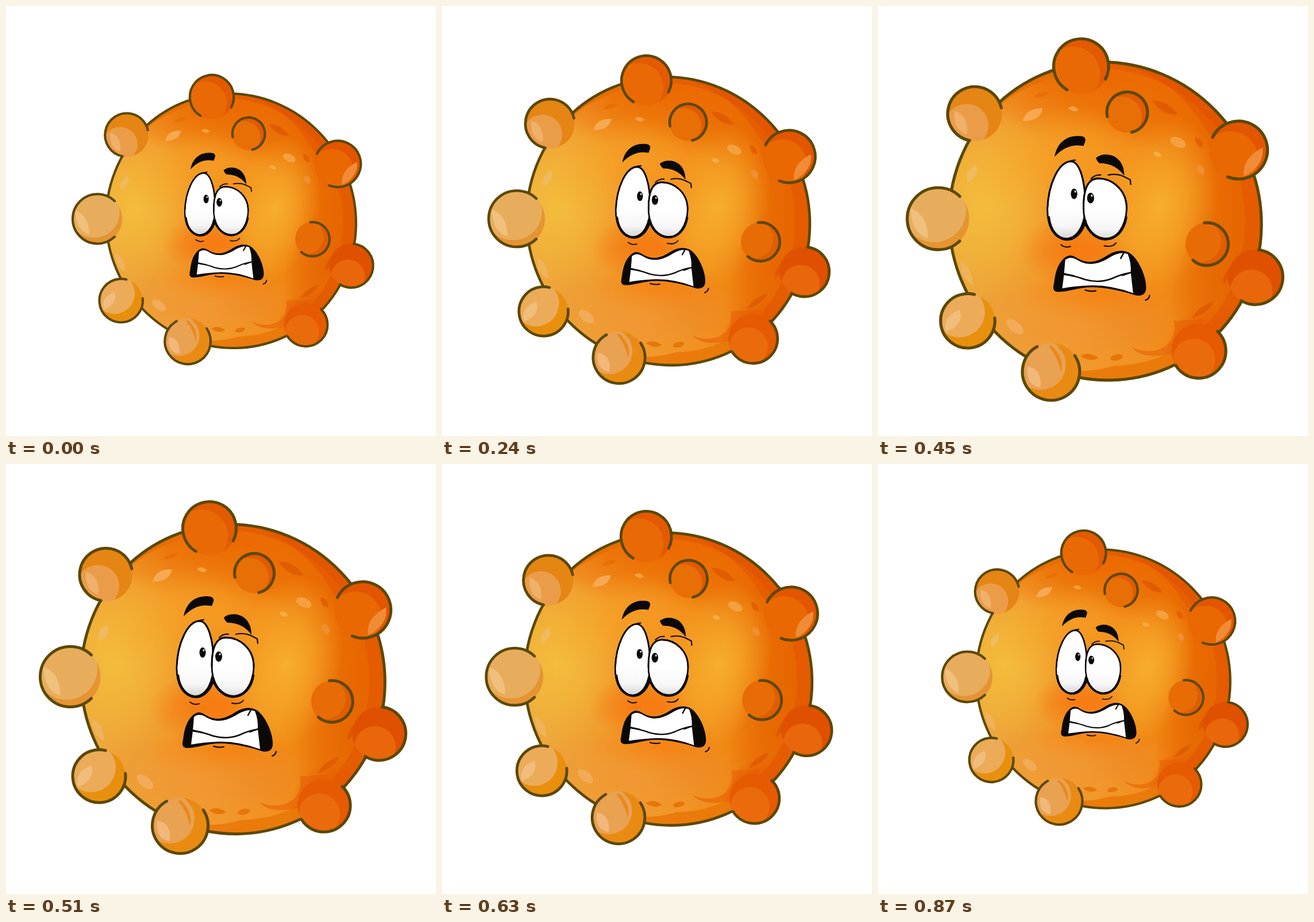
An HTML page with a canvas that plays this animation: 748x748 px, repeating every 0.9 s.

```html
<!DOCTYPE html>
<html lang="en">
<head>
<meta charset="utf-8">
<title>Pulsing germ</title>
<style>
html, body { margin: 0; width: 100%; height: 100%; overflow: hidden; background: #fff; }
canvas { display: block; width: 748px; height: 748px; }
</style>
</head>
<body>
<canvas id="stage" width="748" height="748"></canvas>
<script>
const ctx = document.getElementById('stage').getContext('2d');
const LOOP = 900, STEP = 30, GROWTH = 0.25;
const DRAWN_SCALE = 1 + GROWTH * 390 / 450; // size at which the shapes below are measured
const CENTER = { x: 376.4, y: 371.6 };
const OUTLINE = '#5b4806';
const rad = deg => deg * Math.PI / 180;

function ellipse(x, y, rx, ry, fill, deg = 0) {
  ctx.beginPath();
  ctx.ellipse(x, y, rx, ry, rad(deg), 0, 7);
  ctx.fillStyle = fill;
  ctx.fill();
}

function glow(x, y, rx, ry, rgb, alpha, deg = 0) {
  ctx.save();
  ctx.translate(x, y);
  ctx.rotate(rad(deg));
  ctx.scale(rx, ry);
  const g = ctx.createRadialGradient(0, 0, 0, 0, 0, 1);
  g.addColorStop(0, `rgba(${rgb},${alpha})`);
  g.addColorStop(0.45, `rgba(${rgb},${alpha * 0.65})`);
  g.addColorStop(1, `rgba(${rgb},0)`);
  ellipse(0, 0, 1, 1, g);
  ctx.restore();
}

function shape(d, fill, stroke, width) {
  const path = new Path2D(d);
  if (fill) { ctx.fillStyle = fill; ctx.fill(path); }
  if (stroke) { ctx.strokeStyle = stroke; ctx.lineWidth = width; ctx.stroke(path); }
}

// Pointed almond-shaped freckle
function leaf(x, y, length, width, deg, fill) {
  ctx.save();
  ctx.translate(x, y);
  ctx.rotate(rad(deg));
  shape(`M${-length} 0Q${-length * 0.2} ${-width * 2} ${length} 0Q${length * 0.2} ${width * 2} ${-length} 0Z`, fill);
  ctx.restore();
}

function bodyPath() {
  ctx.beginPath();
  ctx.ellipse(394.8, 374.2, 270.3, 263.4, rad(67), 0, 7);
}

function drawBody() {
  ctx.save();
  bodyPath();
  ctx.clip();
  const base = ctx.createLinearGradient(135, 430, 660, 290);
  base.addColorStop(0, '#eca43c');
  base.addColorStop(0.3, '#f19a2a');
  base.addColorStop(0.6, '#f08a16');
  base.addColorStop(0.85, '#e96b02');
  base.addColorStop(1, '#e66000');
  ctx.fillStyle = base;
  ctx.fillRect(120, 90, 560, 570);

  glow(390, 125, 290, 125, '235,104,0', 1, 5);
  glow(190, 345, 125, 165, '244,190,60', 0.95, 10);
  glow(290, 265, 130, 75, '246,165,40', 0.55, -25);
  glow(375, 270, 120, 70, '247,155,35', 0.7);
  glow(487, 350, 95, 155, '247,176,48', 0.95, 14);
  glow(335, 425, 85, 60, '246,116,12', 0.75);
  glow(375, 424, 60, 35, '250,118,16', 0.6);
  glow(375, 500, 130, 50, '246,124,12', 0.7);
  glow(330, 560, 170, 75, '240,150,55', 0.7, 10);
  glow(450, 545, 90, 60, '238,136,40', 0.6);
  glow(600, 470, 85, 160, '230,100,0', 0.8, 20);
  glow(572, 582, 80, 65, '231,86,0', 1, -25);

  // Rim shadow on the top, the right and the bottom
  shape('M310 122C470 88 590 180 622 300C657 440 590 545 520 590L555 660L700 590V90H310Z', 'rgba(227,88,0,.68)');
  shape('M395 100C485 120 530 160 570 226L690 300V90Z', 'rgba(224,76,0,.42)');
  shape('M193 555C260 620 335 642 410 619C455 618 492 607 525 582L530 650H180Z', 'rgba(233,119,8,.85)');
  shape('M511 543C520 586 478 605 440 588C456 607 495 606 526 590L565 540Z', 'rgba(229,94,4,.55)');
  shape('M219 176Q255 146 314 129L306 116Q255 134 215 166Z', 'rgba(229,107,0,.75)');

  leaf(272, 194, 20, 8, -32, '#f6a952');
  leaf(341, 184, 9, 4, 8, '#f5a13d');
  ellipse(518, 241, 14, 8, '#f4a03e', 25);
  ellipse(483, 261, 7, 4, '#f6ab45', 20);
  ellipse(556, 287, 6, 9, '#f08e32', -30);
  ellipse(242, 553, 17, 9, '#f1ab59', 40);
  leaf(169, 294, 16, 7, -65, '#f0ba60');
  leaf(160, 462, 22, 7, 62, '#f0b35c');
  leaf(287, 160, 14, 4, -20, '#e76f04');
  leaf(496, 182, 25, 7, 28, '#e15c00');
  leaf(554, 241, 11, 5, 52, '#e35f00');
  leaf(603, 464, 19, 5, -63, '#dd5900');
  leaf(561, 524, 24, 5, -38, '#df5c00');
  leaf(368, 604, 15, 5, 5, '#e67608');
  ellipse(414, 605, 11, 5, '#e67608', -12);
  ctx.restore();

  bodyPath();
  ctx.strokeStyle = OUTLINE;
  ctx.lineWidth = 5;
  ctx.stroke();
}

function knob({ at: [x, y, r], line: [from, to], dark, light, spot: [sx, sy, sr], shine }) {
  ctx.save();
  ctx.beginPath();
  ctx.arc(x, y, r, 0, 7);
  ctx.clip();
  ctx.fillStyle = dark;
  ctx.fillRect(x - r, y - r, r * 2, r * 2);
  ellipse(x + sx, y + sy, sr, sr, light);
  if (shine) {
    const [dx, dy, rx, ry, deg, color] = shine;
    leaf(x + dx, y + dy, rx, ry, deg, color);
  }
  ctx.restore();
  ctx.beginPath();
  ctx.arc(x, y, r, rad(from), rad(to));
  ctx.strokeStyle = OUTLINE;
  ctx.lineWidth = 5;
  ctx.stroke();
}

const knobs = [
  { at: [354, 112, 46.5], line: [121, 388], dark: '#e35a03', light: '#e96a05', spot: [-14, 13, 46] },
  { at: [174, 192.5, 46], line: [101, 347], dark: '#e58513', light: '#eb9c48', spot: [-14, 20, 37], shine: [-24, 15, 23, 9, 62, '#efb06a'] },
  { at: [112, 370, 52.5], line: [46, 314], dark: '#e59432', light: '#e8ad5c', spot: [-7, -14, 54], shine: [-32, 8, 29, 10, 60, '#f0c07d'] },
  { at: [162, 543, 46], line: [-6, 284], dark: '#e98f0e', light: '#ebab59', spot: [-14, -15, 43], shine: [-25, 0, 22, 10, -58, '#f1bd7c'] },
  { at: [303, 629, 48.5], line: [-34, 241], dark: '#e98b12', light: '#e9a152', spot: [-18, -12, 43], shine: [-29, 9, 21, 10, 58, '#f1b87a'] },
  { at: [553, 594, 46], line: [-46, 148], dark: '#e65a02', light: '#ea6b0c', spot: [-8, 15, 36] },
  { at: [649, 469, 46.5], line: [-83, 121], dark: '#df5000', light: '#e9660a', spot: [-7, 23, 36] },
  { at: [620.5, 253.8, 49], line: [206, 472], dark: '#e35500', light: '#e96802', spot: [-13, 14, 46], shine: [25, 20, 29, 10, -57, '#f08c36'] },
  { at: [432, 190, 34.5], line: [168, 437], dark: '#e05a02', light: '#e86e06', spot: [-9, 7, 34] },
  { at: [567, 413, 36.2], line: [-97, 131], dark: '#e05d01', light: '#e76c05', spot: [-12, -5, 36] }
];

function drawEyes() {
  const ink = '#0b0908';
  const left = 'M337 273C352 274 361 307 361 345C361 381 348 404 327 404C307 403 297 381 297 354C298 312 316 273 337 273Z';
  const right = 'M381 302C407 301 431 322 431 352C430 383 414 405 394 405C373 404 358 380 358 350C358 324 364 303 381 302Z';
  for (const [d, y] of [[left, 350], [right, 354]]) {
    shape(d, '#fff', ink, 3);
    ctx.save();
    ctx.clip(new Path2D(d));
    const shade = ctx.createLinearGradient(0, y, 0, y + 55);
    shade.addColorStop(0, '#fff');
    shade.addColorStop(0.6, '#f6f6f6');
    shade.addColorStop(1, '#d2d2d2');
    ctx.fillStyle = shade;
    ctx.fillRect(290, y, 150, 70);
    ctx.restore();
    shape(d, null, ink, 2.5);
  }
  shape('M299 368C304 412 348 420 361 374M360 374C374 416 422 415 430 368', null, ink, 4.5);
  ellipse(342, 328, 5.5, 9, ink);
  ellipse(370, 335, 6, 9, ink);
  ellipse(344, 324, 1.5, 2, '#ddd');
  ellipse(372, 331, 1.5, 2, '#ddd');
  shape('M315 288Q326 272 344 271M371 302Q378 295 387 296M400 296Q415 293 427 299L437 304L438 312', null, ink, 2.2);
  shape('M320 414Q327 420 336 417M393 416Q407 419 413 411', null, ink, 2);
  shape('M309 265C313 244 326 230 349 230Q363 230 361 239L358 247C339 243 323 250 309 265Z', ink);
  shape('M379 267C389 259 404 260 414 267C423 274 427 285 427 297C416 282 402 276 385 276Q381 273 379 267Z', ink);
}

function drawMouth() {
  const ink = '#0b0908';
  shape('M325 437Q335 428 346 436C367 449 383 442 400 431Q419 420 434 427C450 435 465 468 464 488Q463 502 447 500C426 493 397 486 372 486C350 486 333 494 314 494Q304 493 308 480C310 462 314 447 325 437Z', ink);
  shape('M327 440Q335 433 346 439C367 453 386 446 405 434Q422 425 433 430Q439 445 438 461L442 496Q404 482 370 483Q343 484 322 488L325 464Z', '#fff');
  shape('M323 464Q345 467 360 473Q385 480 407 471Q424 463 440 461M324 463L342 467M421 437L426 428M438 461L424 466', null, ink, 2.5);
  shape('M361 491Q370 494 379 492M463 508Q469 506 470 500', null, ink, 2.2);
}

function draw(scale) {
  ctx.setTransform(1, 0, 0, 1, 0, 0);
  ctx.fillStyle = '#fff';
  ctx.fillRect(0, 0, 748, 748);
  ctx.translate(CENTER.x, CENTER.y);
  ctx.scale(scale / DRAWN_SCALE, scale / DRAWN_SCALE);
  ctx.translate(-CENTER.x, -CENTER.y);
  ctx.lineCap = ctx.lineJoin = 'round';
  drawBody();
  knobs.forEach(knob);
  // Creases on the bottom knob
  shape('M304 585Q326 605 320 630Q315 604 299 586ZM318 587Q335 596 337 613Q328 599 314 587Z', '#e58a1b');
  drawEyes();
  drawMouth();
}

function frame(now) {
  const t = Math.floor(now % LOOP / STEP) * STEP;
  const half = LOOP / 2;
  draw(1 + GROWTH * (1 - Math.abs(t - half) / half));
  requestAnimationFrame(frame);
}
frame(0);
</script>
</body>
</html>
```
